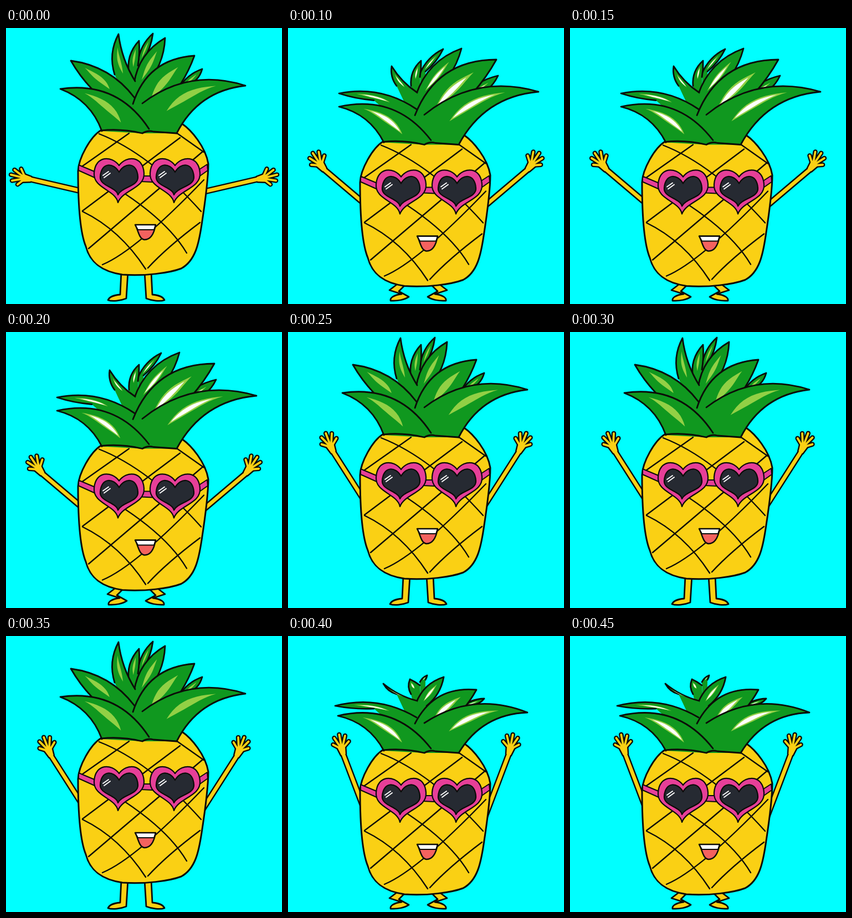
Write an HTML page with a canvas that moves like this. It is 498 px wide and 498 px high and loops after 500 ms.

```html
<!DOCTYPE html>
<html lang="en">
<head>
<meta charset="utf-8">
<title>Dancing pineapple</title>
<style>
html, body { margin: 0; width: 100%; height: 100%; overflow: hidden; background: #0ff; }
canvas { display: block; }
</style>
</head>
<body>
<canvas id="stage" width="498" height="498"></canvas>
<script>
const ctx = document.getElementById('stage').getContext('2d');
const SKY = '#0ff', INK = '#0b0b08', YELLOW = '#fad014', GREEN = '#10981f', LIME = '#92d045',
      PINK = '#e63f98', LENS = '#262a32', RED = '#f4625f', WHITE = '#fff';

// Leaf roots from back to front; a bend is a share of the edge's length.
const leaves = [
  { left: [312, 108], leftBend: .18, right: [325, 103], rightBend: -.29 },
  { left: [238, 62], leftBend: .19, right: [248, 58], rightBend: -.11 },
  { left: [222, 84], leftBend: .25, right: [238, 68], rightBend: -.06 },
  { left: [231, 100], leftBend: .24, right: [250, 105], rightBend: -.19 },
  { left: [196, 84], leftBend: .21, right: [233, 96], rightBend: .11 },
  { left: [155, 110], leftBend: .06, right: [232, 126], rightBend: -.21 },
  { left: [229, 137], leftBend: .34, right: [280, 145], rightBend: -.11 },
  { left: [246, 136], leftBend: .26, right: [308, 190], rightBend: .27 },
  { left: [173, 186], leftBend: -.23, right: [258, 182], rightBend: -.32 },
];
const upright = [[354, 74], [265, 10], [240, 23], [287, 18], [203, 11], [117, 59], [340, 50], [432, 104], [98, 110]];
const swept = [[379, 86], [280, 38], [240, 59], [313, 37], [187, 69], [92, 118], [376, 57], [452, 115], [92, 142]];
const crouched = [[354, 113], [251, 71], [220, 78], [281, 74], [172, 86], [85, 126], [340, 97], [432, 138], [90, 144]];

const poses = [
  { from: 0, drop: 0, tips: upright, shoulder: 296, wrist: [45, 273], turn: -80 },
  { from: 100, drop: 20.5, tips: swept, shoulder: 322, wrist: [66, 256], turn: -38 },
  { from: 250, drop: 0, tips: upright, shoulder: 314, wrist: [82, 217], turn: -25 },
  { from: 400, drop: 21, tips: crouched, shoulder: 330, wrist: [100, 214], turn: -15 },
];

const body = 'M172 184C152 196 131 235 130 258C130 300 132 365 144 394C152 425 175 440 210 445' +
  'C250 448 295 442 316 434C342 420 348 388 353 355C359 316 365 270 365 245C360 214 334 184 318 173L300 160Z';
const rising = 'M134 252L222 190M138 330L314 198M149 398L356 222M174 427Q234 402 357 274M256 433Q290 396 350 351';
const falling = 'M306 188L357 224M168 191Q258 226 352 331M134 252Q280 328 326 406M138 331Q206 364 252 435';
const standingLeg = 'M208 440L206 481C194 482 186 486 184 491C192 494 207 492 217 488L220 440Z';
const bentLeg = 'M200 460L183 473L205 480C190 482 184 487 185 492C198 493 211 490 218 485L200 475L215 460Z';

function draw(path, fill, line, width = 2.8) {
  const shape = new Path2D(path);
  if (fill) { ctx.fillStyle = fill; ctx.fill(shape); }
  if (line) { ctx.strokeStyle = line; ctx.lineWidth = width; ctx.stroke(shape); }
}

function shifted(x, y, paint) {
  ctx.save();
  ctx.translate(x, y);
  paint();
  ctx.restore();
}

function bothSides(span, paint) {
  paint();
  shifted(span, 0, () => { ctx.scale(-1, 1); paint(); });
}

const mix = (a, b, t) => a.map((v, i) => v + (b[i] - v) * t);

function edge(root, tip, bend) {
  const [dx, dy] = [tip[0] - root[0], tip[1] - root[1]];
  const middle = mix(root, tip, .5);
  const control = [middle[0] + bend * dy, middle[1] - bend * dx];
  return { control, at: t => mix(mix(root, control, t), mix(control, tip, t), t) };
}

// A tapered streak between the two edges of a leaf.
function glint(left, right, start, end, spread, color) {
  const side = sign => Array.from({ length: 13 }, (_, i) => {
    const t = start + (end - start) * i / 12;
    return mix(left.at(t), right.at(t), .5 + sign * spread * Math.sin(Math.PI * i / 12));
  });
  draw('M' + [...side(-1), ...side(1).reverse()].join('L') + 'Z', color);
}

function crown({ tips, drop }) {
  const heart = [246, 190 + drop];
  leaves.forEach((leaf, i) => {
    const tip = tips[i];
    const [a, b] = [leaf.left, leaf.right].map(([x, y]) => [x, y + drop]);
    const left = edge(a, tip, leaf.leftBend), right = edge(b, tip, leaf.rightBend);
    const outline = `M${a}Q${left.control} ${tip}Q${right.control} ${b}`;
    draw(`${outline}L${heart}Z`, GREEN);
    draw(outline, null, INK);
    glint(left, right, .1, .7, .12, LIME);
    if (drop) glint(left, right, .14, .6, .07, WHITE);
  });
  shifted(0, drop, () => draw('M172 185Q207 181 246 190Q256 184 266 187L308 190', null, INK));
}

function arm({ shoulder, wrist, turn }) {
  const limb = `M144 ${shoulder}L${wrist}`;
  const place = new DOMMatrix().translate(...wrist).rotate(turn);
  const hand = new Path2D();
  for (let i = -2; i <= 2; i++) {
    const angle = (i * 17 + 3) * Math.PI / 180, reach = 37 - 2.8 * i * i;
    hand.addPath(new Path2D(`M0 -10L${reach * Math.sin(angle)} ${-reach * Math.cos(angle)}`), place);
  }
  const palm = new Path2D();
  palm.addPath(new Path2D('M-4 0L-7 -14Q0 -23 7 -15L4 0Z'), place);
  draw(limb, null, INK, 11.5);
  draw(hand, null, INK, 8.5);
  draw(palm, INK, INK, 5);
  draw(limb, null, YELLOW, 6.5);
  draw(hand, null, YELLOW, 3.8);
  draw(palm, YELLOW);
}

// Starts at the notch; w is half the width, h the drop to the point.
const heart = (x, y, w, h) =>
  `M${x} ${y}C${x - .3 * w} ${y - 18} ${x - .95 * w} ${y - 18} ${x - w} ${y + .2 * h}` +
  `C${x - 1.05 * w} ${y + .62 * h} ${x - .15 * w} ${y + .65 * h} ${x - 2} ${y + h}` +
  `C${x + .15 * w} ${y + .65 * h} ${x + 1.05 * w} ${y + .62 * h} ${x + w} ${y + .2 * h}` +
  `C${x + .95 * w} ${y - 18} ${x + .3 * w} ${y - 18} ${x} ${y}Z`;

function face() {
  draw('M131 247L162 260L160 270L131 257ZM346 257L363 246L364 257L347 269ZM244 267L264 267L264 278L244 277Z', PINK, INK, 2);
  for (const x of [0, 101]) shifted(x, 0, () => {
    draw(heart(204, 248, 45, 67), PINK, INK, 2.2);
    draw(heart(204, 260, 34, 41), LENS, INK, 2.2);
    draw('M175 266L185 259M177 270L188 262', null, WHITE, 2);
  });
  const mouth = 'M233 355L270 355C267 372 261 382 250 382C240 381 239 366 233 355Z';
  draw(mouth, RED);
  draw('M233 355L270 355L267 364L238 364Z', WHITE, INK, 2);
  draw(mouth, null, INK, 2.4);
}

function render(pose) {
  ctx.fillStyle = SKY;
  ctx.fillRect(0, 0, 498, 498);
  ctx.lineCap = ctx.lineJoin = 'round';
  bothSides(498, () => arm(pose));
  bothSides(470, () => draw(pose.drop ? bentLeg : standingLeg, YELLOW, INK));
  shifted(0, pose.drop, () => {
    draw(body, YELLOW, INK, 3);
    draw(rising + falling, null, INK, 2.4);
    face();
  });
  crown(pose);
}

function tick() {
  const time = performance.now() % 500;
  render(poses.findLast(pose => pose.from <= time));
  requestAnimationFrame(tick);
}
tick();
</script>
</body>
</html>
```
